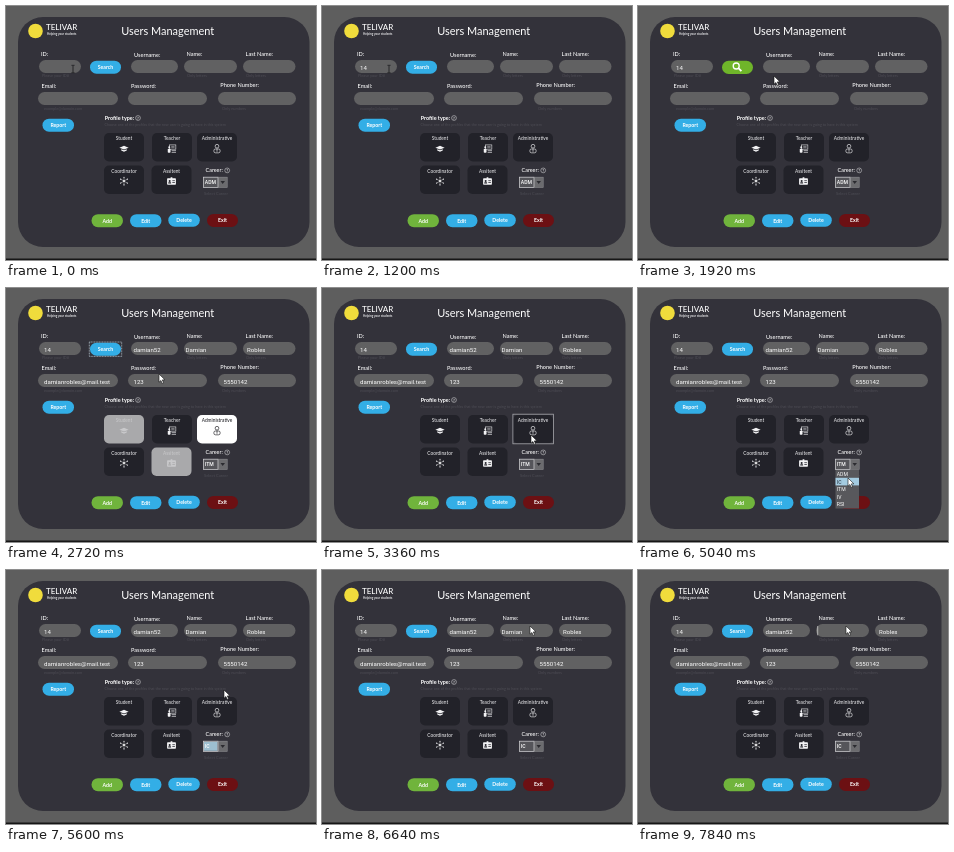
An HTML page with a canvas that plays this animation: 310 px wide and 254 px high, repeating every 8000 ms.

```html
<!DOCTYPE html>
<html lang="en">
<head>
<meta charset="utf-8">
<title>Users Management</title>
<style>
html, body { margin: 0; width: 100%; height: 100%; overflow: hidden; background: #5e5e5e; }
canvas { display: block; width: 310px; height: 254px; }
</style>
</head>
<body>
<canvas id="stage"></canvas>
<script>
const W = 310, H = 254, LOOP = 8000, TICK = 80;
const cv = document.getElementById('stage');
const c = cv.getContext('2d');
const dpr = window.devicePixelRatio || 1;
cv.width = W * dpr;
cv.height = H * dpr;

const UI = 'Lato, sans-serif', INPUT = 'Roboto, sans-serif';
const BLUE = '#33aee6', GREEN = '#70b43c', FIELD = '#616162', CARD = '#222229', HINT = '#4e4d55';

function box(x, y, w, h, r, color) {
  c.fillStyle = color;
  c.beginPath();
  c.roundRect(x, y, w, h, r);
  c.fill();
}
function frame(x, y, w, h, color, width = 0.8) {
  c.strokeStyle = color;
  c.lineWidth = width;
  c.strokeRect(x, y, w, h);
}
function text(s, x, y, size, color = '#fff', align = 'left', weight = 400, font = UI) {
  c.font = `${weight} ${size}px ${font}`;
  c.textAlign = align;
  c.fillStyle = color;
  c.fillText(s, x, y);
}
function disc(x, y, r, color) {
  c.fillStyle = color;
  c.beginPath();
  c.arc(x, y, r, 0, 7);
  c.fill();
}
function line(color, width, ...p) {
  c.strokeStyle = color;
  c.lineWidth = width;
  c.beginPath();
  for (let i = 0; i < p.length; i += 2) c.lineTo(p[i], p[i + 1]);
  c.stroke();
}
function poly(color, ...p) {
  c.fillStyle = color;
  c.beginPath();
  for (let i = 0; i < p.length; i += 2) c.lineTo(p[i], p[i + 1]);
  c.closePath();
  c.fill();
}
function pill(s, x, y, w, color) {
  box(x, y, w, 13, 6.5, color);
  text(s, x + w / 2, y + 8.3, 5.2, '#fff', 'center', 700);
}
function help(x, y) {
  c.strokeStyle = '#e4e4e6';
  c.lineWidth = 0.5;
  c.beginPath();
  c.arc(x, y, 2.4, 0, 7);
  c.stroke();
  text('?', x, y + 1.5, 4.2, '#fff', 'center');
}

const icons = {
  cap(k) {
    poly(k, -5, -1, 0, -3, 5, -1, 0, 1);
    poly(k, -3, 0.6, 0, 1.9, 3, 0.6, 3, 2, 0, 3.4, -3, 2);
  },
  board(k) {
    frame(-2.8, -4, 7, 4.6, k, 0.6);
    line(k, 0.5, -0.8, -2.4, 2.8, -2.4);
    line(k, 0.5, -0.8, -1, 2.8, -1);
    disc(-3, -1.5, 1.1, k);
    box(-4.6, 0.2, 3, 4.2, 0.8, k);
    box(-0.4, 2, 4.8, 0.7, 0, k);
    box(-0.4, 3.6, 4.8, 0.7, 0, k);
  },
  person(k) {
    c.strokeStyle = k;
    c.lineWidth = 0.7;
    c.beginPath();
    c.arc(0, -2.6, 2, 0, 7);
    c.stroke();
    c.beginPath();
    c.roundRect(-3.4, 0.4, 6.8, 4.2, 1.8);
    c.stroke();
    line(k, 0.7, 0, 0.4, 0, 3.4);
  },
  net(k) {
    for (let i = 0; i < 6; i++) {
      const a = i * Math.PI / 3 + Math.PI / 6, x = 4.2 * Math.cos(a), y = 4.2 * Math.sin(a);
      line(k, 0.5, 0, 0, x, y);
      disc(x, y, 0.65, k);
    }
    disc(0, 0, 1.1, k);
  },
  badge(k, bg) {
    box(-4.8, -3, 9.6, 7, 0.8, k);
    box(-1, -4.2, 2, 1.8, 0.4, k);
    disc(-2, -0.2, 1.1, bg);
    box(-3.6, 1.2, 3.2, 1.5, 0.6, bg);
    box(0.9, -0.8, 2.8, 0.8, 0, bg);
    box(0.9, 1.2, 2.8, 0.8, 0, bg);
  }
};

const cards = [
  ['Student', 98, 127, 'cap'],
  ['Teacher', 146, 127, 'board'],
  ['Administrative', 191, 127, 'person'],
  ['Coordinator', 98, 159.5, 'net'],
  ['Assitent', 145.5, 159.5, 'badge']
];
function card([name, x, y, icon], bg, ink) {
  box(x, y, 40, 28.5, 5, bg);
  text(name, x + 20, y + 7.2, 4.8, ink, 'center');
  c.save();
  c.translate(x + 20, y + 15.6);
  c.scale(0.92, 0.92);
  icons[icon](ink, bg);
  c.restore();
}
function plusCard(x, y) {
  box(x, y, 40, 28.5, 5, '#2fa637');
  box(x + 14, y + 13.2, 12, 1.8, 0, '#fff');
  box(x + 19.1, y + 8.1, 1.8, 12, 0, '#fff');
}

// label, label x, label y, field x, top, width, value x, value
const fields = [
  ['ID:', 35, 50, 33, 54, 42, 38],
  ['Username:', 128, 50.8, 125, 54, 47, 127.5, 'damian52'],
  ['Name:', 180.5, 50, 178, 54, 53, 179.5, 'Damian'],
  ['Last Name:', 239.5, 50, 237, 54, 52.5, 241, 'Robles'],
  ['Email:', 35.5, 82.2, 32, 86, 80, 38, 'damianrobles@mail.test'],
  ['Password:', 125, 82.4, 122, 86, 79, 127.5, '123'],
  ['Phone Number:', 214.3, 80.8, 212, 86, 78, 217.5, '5550142']
];
const hints = [
  ['Please your ID#', 36, 71], ['Only letters', 181, 71], ['Only letters', 240, 71],
  ['example@domain.com', 38, 103.5], ['Only numbers', 216, 103.5]
];

// time, x, y of the pointer tip
const path = [
  [1360, 67, 63], [1600, 97, 62], [1760, 99, 62], [1920, 136, 70], [2240, 149, 82],
  [2720, 153, 86], [2960, 183, 112], [3200, 211, 143], [3360, 209, 147], [3600, 168, 172],
  [3760, 178, 167], [3840, 194, 158], [4080, 213, 173], [4480, 215, 176], [4800, 212, 187],
  [5040, 210, 190], [5200, 210, 193], [5360, 214, 160], [5600, 218, 120], [5760, 218, 120],
  [6240, 208, 56]
];
const erase = [6800, 6880, 6960, 7280, 7360, 7680];

function pointerAt(t) {
  const i = path.findIndex(p => p[0] > t);
  if (i < 0) return path[path.length - 1].slice(1);
  if (i === 0) return path[0].slice(1);
  const [t0, x0, y0] = path[i - 1], [t1, x1, y1] = path[i];
  const u = (t - t0) / (t1 - t0), e = u * u * (3 - 2 * u);
  return [x0 + (x1 - x0) * e, y0 + (y1 - y0) * e];
}
function pointer(x, y) {
  c.save();
  c.translate(x, y);
  c.beginPath();
  [[0, 0], [0, 8.2], [1.9, 6.5], [3.2, 9.4], [4.6, 8.8], [3.3, 5.9], [5.9, 5.8]]
    .forEach(p => c.lineTo(...p));
  c.closePath();
  c.fillStyle = '#fff';
  c.strokeStyle = '#111';
  c.lineWidth = 0.6;
  c.fill();
  c.stroke();
  c.restore();
}
function ibeam(x, y) {
  const k = '#17171b';
  line(k, 0.8, x, y - 3.5, x, y + 3.5);
  line(k, 0.7, x - 1.6, y - 3.7, x + 1.6, y - 3.7);
  line(k, 0.7, x - 1.6, y + 3.7, x + 1.6, y + 3.7);
}

function header() {
  disc(29.5, 25, 7.3, '#f0dc3c');
  text('TELIVAR', 40, 24.2, 8, '#fff', 'left', 500);
  text('Helping your students', 41, 28.6, 3, '#e8e8ea', 'left', 700);
  text('Users Management', 161.7, 29.3, 10.95, '#fff', 'center');
}

function search(t) {
  if (t >= 1520 && t < 2000) {
    box(84, 54.7, 31, 13.3, 6.65, '#6fb52a');
    c.strokeStyle = '#fff';
    c.lineWidth = 1.3;
    c.beginPath();
    c.arc(98.2, 60, 3, 0, 7);
    c.stroke();
    line('#fff', 1.8, 100.4, 62.2, 103.4, 65.2);
  } else pill('Search', 84, 54.7, 31, BLUE);
  if (t >= 2000 && t < 3280) {
    c.setLineDash([1, 0.6]);
    frame(83.3, 54, 32.4, 14.4, '#d5e9f4', 0.6);
    c.setLineDash([]);
  }
}

function form(t) {
  const filled = t >= 2320;
  for (const [label, lx, ly, x, y, w, vx, value] of fields) {
    text(label, lx, ly, 5.6, '#fff', 'left', 500);
    box(x, y, w, 13, 6.5, FIELD);
    let s = filled ? value : '';
    if (label === 'ID:') s = t < 800 ? '' : t < 960 ? '1' : '14';
    if (label === 'Name:') s = s.slice(0, 6 - erase.filter(e => t >= e).length);
    if (s) text(s, vx, y + 9.8, 6.1, '#fff', 'left', 400, INPUT);
    const typing = label === 'ID:' ? t >= 240 && t < 1440 && t % 960 >= 480
      : label === 'Name:' && t >= 6400 && (t >= 7680 || t % 960 < 560);
    if (typing) {
      c.font = `400 6.1px ${INPUT}`;
      const cx = vx + c.measureText(s).width + 0.2;
      line('#eee', 0.6, cx, y + 2, cx, y + 11.3);
    }
  }
  for (const [s, x, y] of hints) text(s, x, y, 3.9, HINT);
}

function profile(t) {
  text('Profile type:', 98.7, 114, 5.45, '#fff', 'left', 700);
  help(132, 112);
  text('Choose one of the profiles that the new user is going to have in this system', 98.5, 120, 3.7, HINT);
  const chosen = t >= 2320 && t < 3280;
  cards.forEach((d, i) => {
    if (chosen && (i === 0 || i === 4)) card(d, '#a9a9ab', '#c9c9cb');
    else if (chosen && i === 2) card(d, '#fff', '#15151a');
    else if (i === 4 && t >= 3520 && t < 4000) plusCard(d[1], d[2]);
    else card(d, CARD, '#f3f3f5');
  });
  if (t >= 3280 && t < 4480) frame(190.9, 126.2, 40.5, 29.6, '#a6a6ab', 0.8);
}

function career(t) {
  text('Career:', 199.6, 166.4, 5.4, '#fff', 'left', 500);
  help(221.2, 164.4);
  const picked = t >= 5280, open = t >= 4480 && t < 5280, focus = picked && t < 6400;
  const value = t < 2320 ? 'ADM' : picked ? 'IC' : 'ITM';
  box(197, 170.8, 24.5, 11, 0, '#55555a');
  box(212, 171.2, 9, 10, 0, '#6b6b6e');
  if (focus) box(198, 171.8, 13.5, 9, 0, '#9dbfd0');
  frame(197.4, 171.2, 14.6, 10.2, '#d0d0d4', 0.7);
  frame(212, 171.2, 9.2, 10.2, '#8c8c90', 0.5);
  poly('#2b2b30', 214.5, 175.1, 219, 175.1, 216.7, 178.1);
  text(value, 198.8, 178.2, 5.1, '#fff', 'left', 500, INPUT);
  text('Select Career', 198, 189, 4.1, HINT);
  if (!open) return;
  box(197.5, 182, 23.5, 38.5, 0, '#58585c');
  const over = t < 4720 ? 0 : 1;
  ['ADM', 'IC', 'ITM', 'IV', 'RSI'].forEach((s, i) => {
    const y = 182.2 + i * 7.6;
    if (i === over) box(197.5, y, 23.5, 7.6, 0, '#a4cbe0');
    text(s, 198.8, y + 5.8, 5.1, i === over ? '#26323c' : '#fff', 'left', 400, INPUT);
  });
}

function draw(t) {
  c.setTransform(dpr, 0, 0, dpr, 0, 0);
  box(0, 0, W, H, 0, '#5e5e5e');
  box(12, 11, 291.5, 230, 25, '#33323a');
  box(0, 252.5, W, 1.5, 0, '#161616');
  header();
  form(t);
  search(t);
  pill('Report', 36.5, 112.7, 31.5, BLUE);
  profile(t);
  pill('Add', 85.5, 208.2, 31.5, GREEN);
  pill('Edit', 124, 208.2, 31.5, BLUE);
  pill('Delete', 162.3, 207.7, 31.5, BLUE);
  pill('Exit', 201, 207.9, 31, '#6c1013');
  career(t);
  const [x, y] = pointerAt(t);
  if (t < 1440) ibeam(x, y);
  else pointer(x, y);
}

function loop() {
  const t = performance.now() % LOOP;
  draw(Math.floor(t / TICK) * TICK);
  requestAnimationFrame(loop);
}
loop();
</script>
</body>
</html>
```
